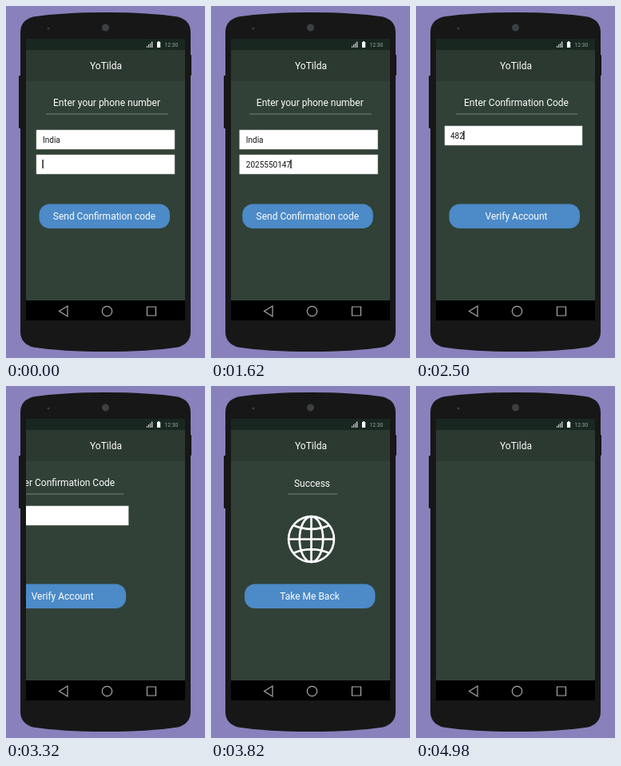
Write an HTML page that moves like this. It is 249 px wide and 440 px high and loops after 5020 ms.

```html
<!DOCTYPE html>
<html lang="en">
<head>
<meta charset="utf-8">
<title>Phone sign-up</title>
<style>
  html, body { margin: 0; height: 100%; overflow: hidden; background: #8881bc; }
  svg { display: block; width: 100vw; height: 100vh; }
  text { font: 12px Roboto, Arial, sans-serif; fill: #fff; }
  .mid { text-anchor: middle; }
  .ink { font-size: 10px; fill: #151515; }
  .rule { stroke: #75827a; stroke-width: 1; }
  .field { fill: #fff; stroke: #c9cdc9; stroke-width: .5; }
  .button { fill: #4c8ac8; }
  .nav { fill: none; stroke: #a9a9a9; stroke-width: 1.2; }
  .globe { fill: none; stroke: #fff; stroke-width: 2.6; }
</style>
</head>
<body>
<svg viewBox="0 0 249 440" xmlns="http://www.w3.org/2000/svg">
  <defs><clipPath id="view"><rect x="25" y="94" width="199" height="274"/></clipPath></defs>

  <!-- phone -->
  <rect width="249" height="440" fill="#8881bc"/>
  <g fill="#171717">
    <rect x="16" y="87" width="4" height="66" rx="1"/>
    <rect x="229" y="61" width="3" height="26" rx="1"/>
    <path d="M18 33Q18 18 34 13.5Q70 8 124.5 8T215 13.5Q231 18 231 33V407Q231 422 215 426.5Q179 432 124.5 432T34 426.5Q18 422 18 407Z"/>
  </g>
  <circle cx="124.5" cy="27" r="4.5" fill="#3b4043"/>
  <circle cx="53" cy="28" r="1.5" fill="#3b4043"/>

  <!-- screen and bars -->
  <rect x="25" y="41" width="199" height="352" fill="#314137"/>
  <rect x="25" y="41" width="199" height="14" fill="#192721"/>
  <rect x="25" y="55" width="199" height="39" fill="#2c3930"/>
  <rect x="25" y="368" width="199" height="25"/>
  <path d="M176 52v-2h1v2zm2 0v-4h1v4zm2 0v-5.500h1v5.500zm2 0v-7.500h1.300v7.500z" fill="#ddd"/>
  <path d="M189 45h1.200v-1h1.800v1h1.200v7h-4.200z" fill="#fff"/>
  <text x="198.500" y="51" style="font-size:6.800px;fill:#9ba39e">12:30</text>
  <text class="mid" x="125" y="78.500">YoTilda</text>
  <path class="nav" d="M66.500 381.500L77 375v13zM176.500 376h11v11h-11z"/>
  <circle class="nav" cx="126.500" cy="381.500" r="6.200"/>

  <g clip-path="url(#view)">
    <g id="phone">
      <text class="mid" x="126" y="124.500">Enter your phone number</text>
      <path class="rule" d="M50 135h153"/>
      <rect class="field" x="38" y="155" width="173" height="24"/>
      <rect class="field" x="38" y="186" width="173" height="24"/>
      <text class="ink" x="46" y="170.500">India</text>
      <text class="ink" x="46" y="201.500" id="number"></text>
      <rect id="caret1" y="192" width="1.300" height="11"/>
      <rect class="button" x="41.500" y="247.500" width="163.500" height="30.500" rx="13"/>
      <text class="mid" x="123" y="266.500">Send Confirmation code</text>
    </g>
    <g id="verify">
      <text class="mid" x="125.500" y="124.500">Enter Confirmation Code</text>
      <path class="rule" d="M50 135h152"/>
      <rect class="field" x="36" y="150" width="172" height="24"/>
      <text class="ink" x="43" y="165.800" id="code"></text>
      <rect id="caret2" y="156" width="1.300" height="11"/>
      <rect class="button" x="41.500" y="247.500" width="163.500" height="30.500" rx="13"/>
      <text class="mid" x="125.500" y="266.500">Verify Account</text>
    </g>
    <g id="success">
      <text class="mid" x="126.500" y="125.500">Success</text>
      <path class="rule" d="M96 135h62"/>
      <g id="globe" class="globe">
        <circle r="28"/>
        <ellipse rx="14.500" ry="28"/>
        <path d="M0-28V28M-28 0H28M-22-17Q0-8 22-17M-22 17Q0 8 22 17"/>
      </g>
      <rect class="button" x="42" y="247.500" width="163.500" height="30.500" rx="13"/>
      <text class="mid" x="123.500" y="266.500">Take Me Back</text>
    </g>
  </g>
</svg>
<script>
const LOOP = 5020, STEP = 271, DIGIT = 5.615;
const $ = id => document.getElementById(id);
const span = (t, a, b) => Math.min(1, Math.max(0, (t - a) / (b - a)));

function bezier(x1, y1, x2, y2) {
  const at = (u, a, b) => 3 * u * (1 - u) * (1 - u) * a + 3 * u * u * (1 - u) * b + u * u * u;
  return x => {
    let lo = 0, hi = 1;
    for (let i = 0; i < 24; i++) {
      const u = (lo + hi) / 2;
      if (at(u, x1, x2) < x) lo = u; else hi = u;
    }
    return at(hi, y1, y2);
  };
}
const slide = bezier(.3, .15, .65, 1);

const fields = [
  { text: "2025550147", x: 46, out: $("number"), caret: $("caret1"), from: 0,
    keys: [60, 220, 260, 300, 340, 540, 660, 780, 880, 1000] },
  { text: "4821", x: 43, out: $("code"), caret: $("caret2"), from: 2160,
    keys: [2200, 2340, 2480, 2620] }
];

function type(f, t) {
  const n = f.keys.filter(k => t >= k).length;
  f.out.textContent = f.text.slice(0, n);
  f.caret.setAttribute("x", f.x - .6 + n * DIGIT);
  f.caret.setAttribute("opacity", t >= f.from ? 1 : 0);
}

function place(id, x) {
  $(id).setAttribute("transform", `translate(${x} 0)`);
}

function draw(t) {
  const a = slide(span(t, 1613, 2140)), b = slide(span(t, 3203, 3740));
  place("phone", -STEP * a);
  place("verify", STEP * (1 - a - b));
  place("success", STEP * (1 - b));
  $("success").setAttribute("opacity", 1 - span(t, 4790, 4980));
  const pulse = 1 + .025 * Math.sin(Math.PI * span(t, 3750, 4100));
  $("globe").setAttribute("transform", `translate(125.5 191.5) scale(${pulse})`);
  fields.forEach(f => type(f, t));
}

const start = performance.now();
function frame() {
  draw((performance.now() - start) % LOOP);
  requestAnimationFrame(frame);
}
frame();
</script>
</body>
</html>
```
